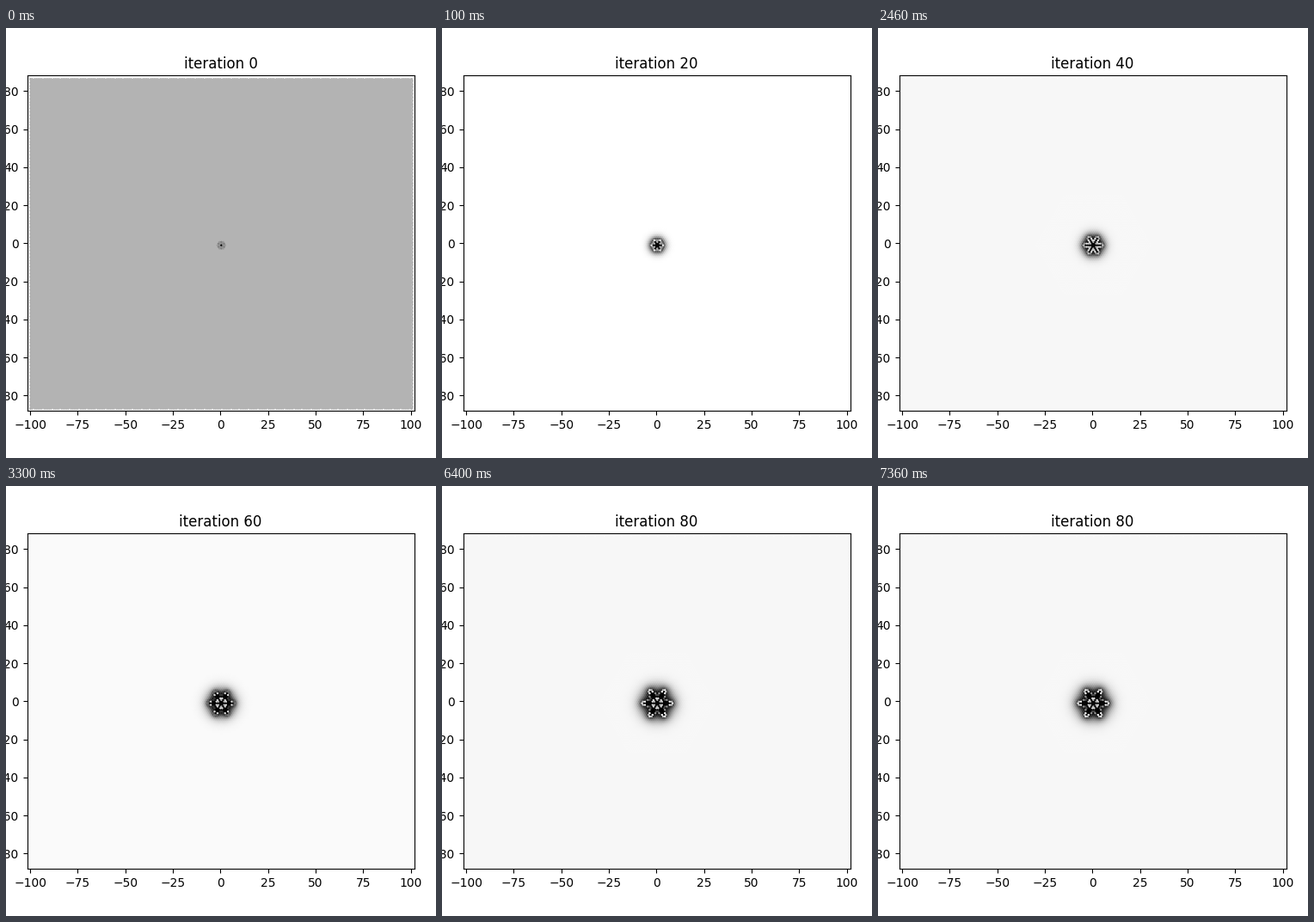
These frames come from a looping animation (500x500 px, 8 s). A matplotlib script:

```python
import numpy as np
import matplotlib.pyplot as plt
from matplotlib.animation import FuncAnimation
from matplotlib.patches import Rectangle

ROW = np.sqrt(3) / 2
N = 65                      # simulated patch, axial coordinates around the seed
C = N // 2
VAPOUR = 0.4
STARTS = [0, 1, 12, 33, 64]     # in steps of 100 ms
SHOWN = [0, 20, 40, 60, 80]
LEVELS = [0.70, 1.0, 0.97, 0.98, 0.97]   # brightness of the far field
HEX = [(0, 1), (0, -1), (1, 0), (-1, 0), (1, -1), (-1, 1)]


def neighbours(grid):
    return [np.roll(grid, shift, (0, 1)) for shift in HEX]


def grow(steps):
    """Snow crystal automaton: vapour diffuses, cells at the ice collect it.

    Returns the free vapour and the collected fill of each cell per step.
    """
    s = np.full((N, N), VAPOUR)
    s[C, C] = 1
    states = []
    for _ in range(steps):
        ice = s >= 1
        near = ice | np.any(neighbours(ice), axis=0)
        free = np.where(near, 0, s)
        s = np.where(near, s, 0) + (free + sum(neighbours(free))) / 7
        fill = np.where(near & (s < 1), s, 0)
        states.append((np.where(near, 0, s / VAPOUR), fill))
    return states


states = grow(SHOWN[-1] + 1)
r, q = np.mgrid[:N, :N] - C
patch = (abs(q) <= 30) & (abs(r) <= 30) & (abs(q + r) <= 30)
px, py = (q + r / 2 + 0.5)[patch], ((r - 1) * ROW)[patch]

rows = np.arange(-100, 101)
inset = (rows % 2) / 2
ex = np.r_[-100 + inset, 100 + inset, rows, rows]
ey = np.r_[rows * ROW, rows * ROW, np.full(201, -100 * ROW), np.full(201, 100 * ROW)]

fig = plt.figure(figsize=(5, 5), dpi=100)
ax = fig.add_axes([0.0492, 0.11, 0.9, 0.78])
ax.set_xlim(-101.6, 101.8)
ax.set_ylim(-87.94, 88.34)
field = ax.add_patch(Rectangle((-100, -100 * ROW), 200, 200 * ROW, lw=0))
edge = ax.scatter(ex, ey, s=1)
cells = ax.scatter(px, py, s=1)
title = ax.set_title("")


def update(i):
    k = np.searchsorted(STARTS, i, side="right") - 1
    level = LEVELS[k]
    field.set_facecolor(str(level))
    edge.set_color(str(level))
    free, fill = states[SHOWN[k]]
    shade = np.clip(free * level + fill, 0, 1)
    cells.set_color(plt.cm.gray(shade[patch]))
    title.set_text(f"iteration {SHOWN[k]}")


anim = FuncAnimation(fig, update, frames=80, interval=100, repeat=True, repeat_delay=0)
plt.show()
```
